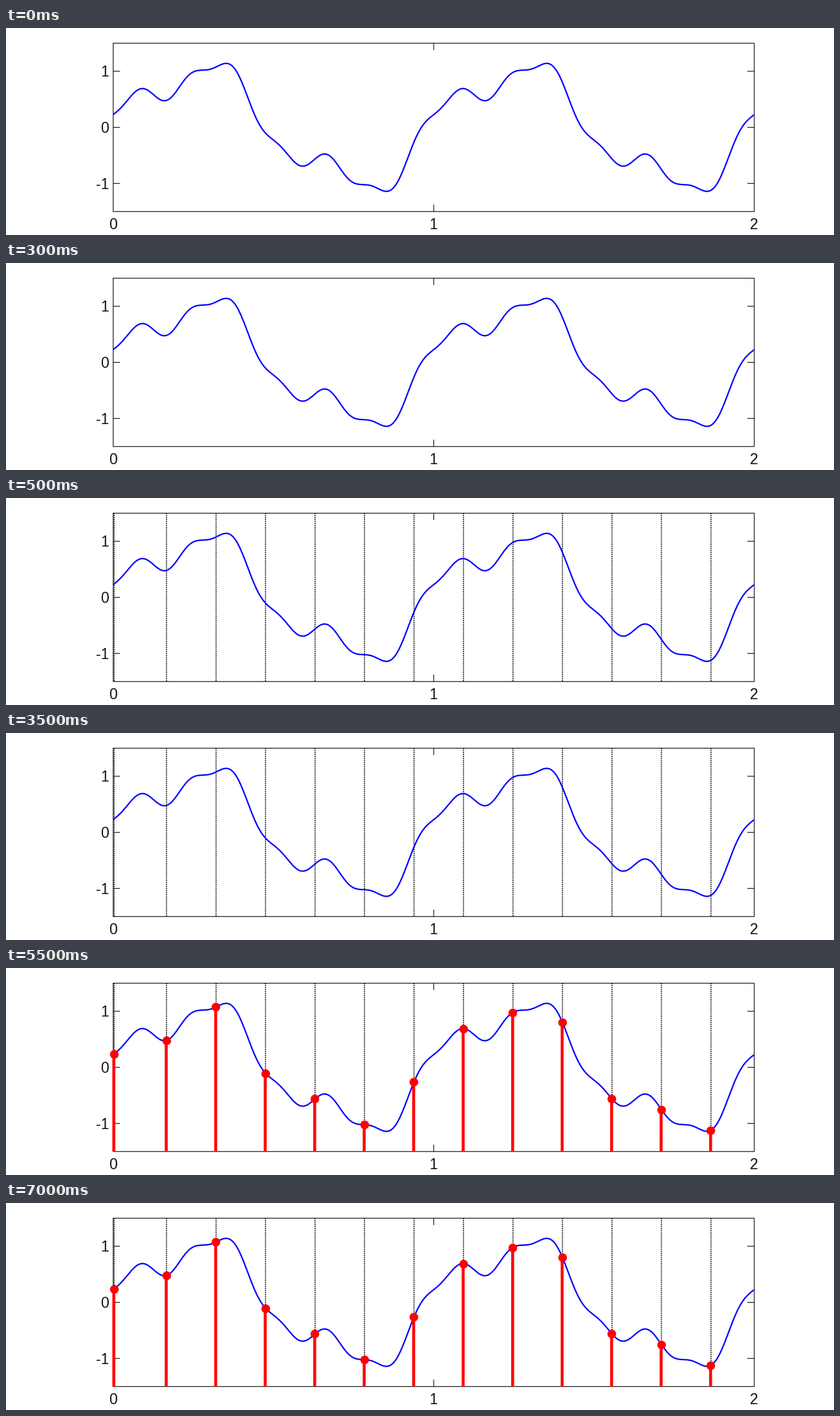
A matplotlib script for the animation above (8000 ms loop, 1280x320 px).

```python
import numpy as np
import matplotlib.pyplot as plt
from matplotlib.animation import FuncAnimation

W, H, DPI = 1280, 320, 100
PX = 72 / DPI  # points per pixel
LEFT, RIGHT, TOP, BOTTOM = 165.7, 1156.7, 23.5, 283.7
TICK = 10
STEP_MS, STEPS = 500, 16
GRID_AT, SAMPLES_AT = 500, 5500

fig = plt.figure(figsize=(W / DPI, H / DPI), dpi=DPI, facecolor="white")
ax = fig.add_axes([0, 0, 1, 1])
ax.set_xlim(0, W)
ax.set_ylim(H, 0)
ax.axis("off")


def to_x(t):
    return LEFT + t * (RIGHT - LEFT) / 2


def to_y(v):
    return (TOP + BOTTOM) / 2 - v * (BOTTOM - TOP) / 3


def signal(t):
    w = 2 * np.pi * t
    return (np.sin(w) + 0.3 * np.sin(3 * w + 0.4 * np.pi)
            + 0.1 * np.sin(7 * w + 1.2 * np.pi))


def line(xs, ys, color, width, **kw):
    kw.setdefault("solid_capstyle", "butt")
    return ax.plot(xs, ys, color=color, lw=width * PX, snap=False, **kw)[0]


def edge(xs, ys):
    line(xs, ys, "#222222", 1.25, zorder=3, solid_capstyle="projecting")


def label(x, y, text, align):
    ax.text(x, y, text, ha=align, va="baseline", color="#111111",
            family="Liberation Sans", size=23 * PX)


# Frame, ticks and labels
edge([LEFT, RIGHT, RIGHT, LEFT, LEFT], [TOP, TOP, BOTTOM, BOTTOM, TOP])
edge([to_x(1)] * 2, [TOP, TOP + TICK])
edge([to_x(1)] * 2, [BOTTOM, BOTTOM - TICK])
for v in (-1, 0, 1):
    edge([LEFT, LEFT + TICK], [to_y(v)] * 2)
    edge([RIGHT, RIGHT - TICK], [to_y(v)] * 2)
    label(159.3, to_y(v) + 8.2, str(v), "right")
for t in (0, 1, 2):
    label(to_x(t) - 0.4, 310.8, str(t), "center")

# Continuous signal
time = np.linspace(0, 2, 1200)
line(to_x(time), to_y(signal(time)), "#0000ff", 2.2, zorder=4)

# Sampling instants: one at the start, then evenly spaced
times = np.append(0.003, 0.1665 + 0.1544 * np.arange(12))
xs, ys = to_x(times), to_y(signal(times))

grid = [line([x, x], [TOP, BOTTOM], "black", 1.7, zorder=2,
             linestyle=(0, (1.6 / 1.7, 1.4 / 1.7)), dash_capstyle="butt")
        for x in xs]

# Sample stems and dots
samples = [line([x, x], [y, BOTTOM], "#ff0000", 4.5, zorder=5)
           for x, y in zip(xs - 0.5, ys)]
samples.append(ax.plot(xs - 0.5, ys, "o", color="#ff0000", ms=13.4 * PX,
                       mew=0, zorder=6, snap=False)[0])


def update(i):
    now = i * STEP_MS
    for art in grid:
        art.set_visible(now >= GRID_AT)
    for art in samples:
        art.set_visible(now >= SAMPLES_AT)
    return grid + samples


anim = FuncAnimation(fig, update, frames=STEPS, interval=STEP_MS,
                     repeat=True, repeat_delay=0, blit=False)
plt.show()
```
